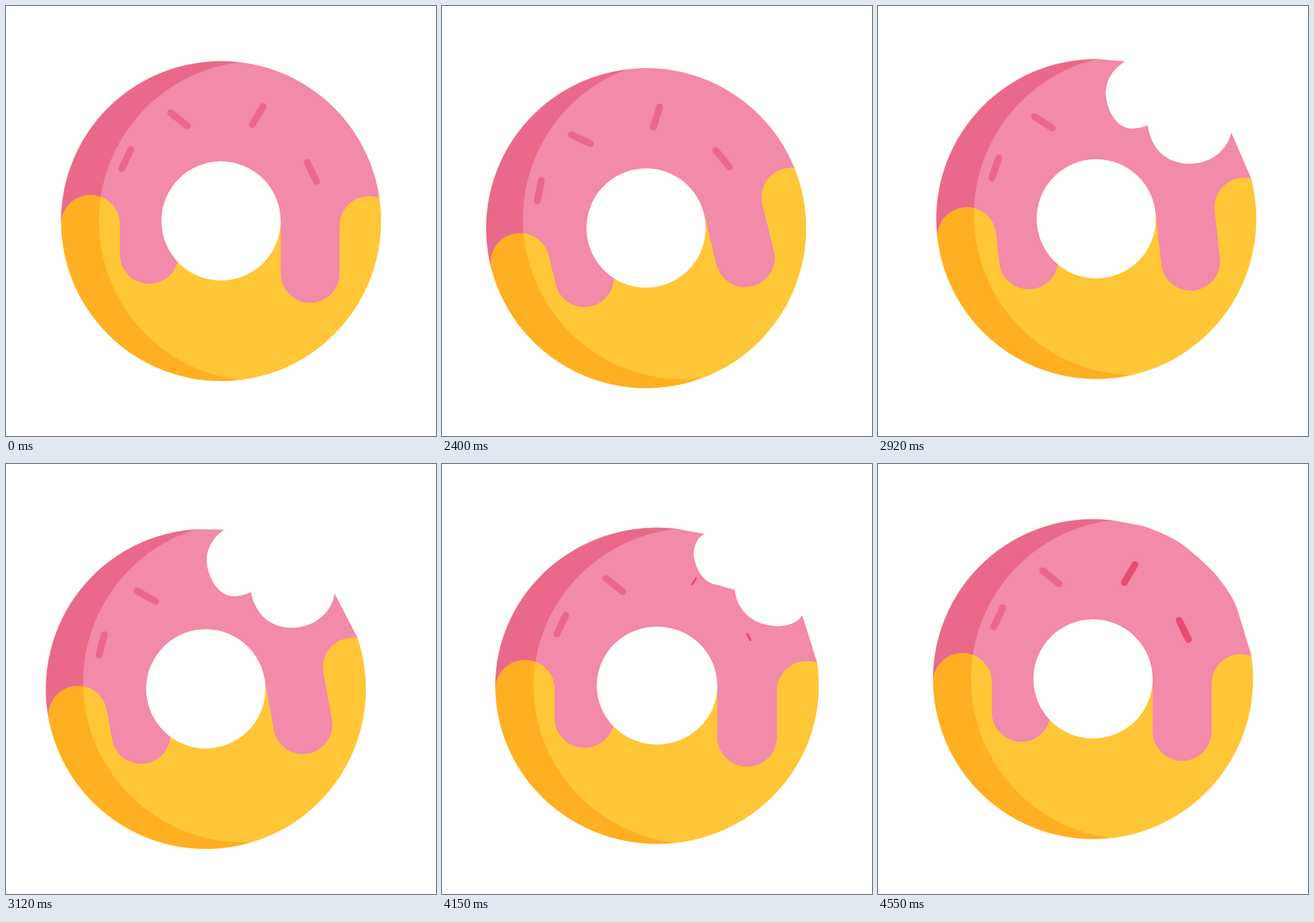
Animation of 748 by 748 pixels, one loop 4.57 s. Source, as an HTML page with a canvas:

```html
<!DOCTYPE html>
<html lang="en">
<head>
<meta charset="utf-8">
<title>Donut</title>
<style>
  html, body { margin: 0; width: 100%; height: 100%; overflow: hidden; background: #fff; }
  canvas { display: block; width: 748px; height: 748px; }
</style>
</head>
<body>
<canvas id="stage" width="748" height="748"></canvas>
<script>
const ctx = document.getElementById('stage').getContext('2d');
const LOOP = 4570, STEP = 25, TAU = Math.PI * 2;
const CX = 374, CY = 374.2, R = 278.4;
const YELLOW = '#ffc637', ORANGE = '#ffaf22', PINK = '#f28aaa', ROSE = '#ea698b', RED = '#e54c70';

// Each key: [time, value, warp of the progress towards this key]
const slide = [[2000, 0], [2350, -24.5, .8], [2705, 78.5], [2755, 78.5], [3045, -37.5], [3300, 10], [3500, 0]];
const turn = [[2000, 0], [2350, -15, .8], [2705, 7.6], [2755, 7.6], [3045, -14.5], [3300, 4], [3500, 0]];
const drop = [[4075, 0], [4365, 70], [4475, -9], [4550, 0]];
const squash = [[4075, 0], [4320, 1], [4365, 1], [4475, -.6], [4550, 0]];
const bite = [[2705, 0], [2780, 1], [4075, 1], [4275, 0]];

const smooth = u => u * u * (3 - 2 * u);

function valueAt(keys, t) {
  if (t <= keys[0][0]) return keys[0][1];
  for (let i = 1; i < keys.length; i++) {
    const [t0, a] = keys[i - 1], [t1, b, warp = 1] = keys[i];
    if (t < t1) return a + (b - a) * smooth(((t - t0) / (t1 - t0)) ** warp);
  }
  return keys[keys.length - 1][1];
}

// Rim points as [x, y]: the start, then three per cubic curve
const whole = [
  [457, 107], [468, 110], [479, 114], [490, 119], [502, 124], [514, 130], [525, 137],
  [539, 147], [553, 159], [565, 170], [577, 181], [589, 193], [598, 206],
  [608, 219], [618, 234], [624, 250]
];
const bitten = [
  [454, 107], [430, 118], [414, 139], [414, 165], [415, 198], [431, 225], [458, 225],
  [466, 225], [475, 224], [481, 222], [481, 267], [511, 297], [555, 297],
  [588, 297], [613, 279], [624, 251]
];

function outline(amount, lumpy) {
  const p = new Path2D();
  if (lumpy) {
    const pts = whole.map(([x, y], i) => [x + (bitten[i][0] - x) * amount, y + (bitten[i][1] - y) * amount]);
    p.arc(CX, CY, R, Math.atan2(333 - CY, 650 - CX), Math.atan2(98 - CY, 405 - CX));
    p.lineTo(...pts[0]);
    for (let i = 1; i < pts.length; i += 3) p.bezierCurveTo(...pts[i], ...pts[i + 1], ...pts[i + 2]);
    p.closePath();
  } else {
    p.arc(CX, CY, R, 0, TAU);
  }
  p.moveTo(CX + 103.8, 373.8);
  p.arc(CX, 373.8, 103.8, 0, TAU);
  return p;
}

const glaze = new Path2D();
glaze.moveTo(60, 60);
glaze.lineTo(60, 380);
glaze.lineTo(95.5, 380);
glaze.arc(146.8, 380, 51.3, Math.PI, 0);
glaze.lineTo(198, 432);
glaze.arc(249.2, 432, 51.2, Math.PI, 0, true);
glaze.lineTo(300.4, 374);
glaze.lineTo(477.8, 374);
glaze.lineTo(477.8, 465);
glaze.arc(529.1, 465, 51.3, Math.PI, 0, true);
glaze.lineTo(580.4, 382);
glaze.arc(631.7, 382, 51.3, Math.PI, TAU * .86);
glaze.lineTo(700, 334);
glaze.lineTo(700, 60);
glaze.closePath();

const rim = new Path2D();
rim.arc(CX, CY, R - .6, 0, TAU);
const shade = new Path2D();
shade.rect(0, 0, 748, 748);
shade.moveTo(440 + R, CY);
shade.arc(440, CY, R, 0, TAU);

function fillShade(color) {
  ctx.save();
  ctx.clip(rim);
  ctx.fillStyle = color;
  ctx.beginPath();
  ctx.rect(0, 0, 430, 748);
  ctx.clip();
  ctx.fill(shade, 'evenodd');
  ctx.restore();
}

function sprinkle(x0, y0, x1, y1, color, size = 1) {
  if (size <= .01) return;
  const mx = (x0 + x1) / 2, my = (y0 + y1) / 2;
  const dx = (x1 - x0) / 2 * size, dy = (y1 - y0) / 2 * size;
  ctx.strokeStyle = color;
  ctx.lineWidth = 12 * size;
  ctx.beginPath();
  ctx.moveTo(mx - dx, my - dy);
  ctx.lineTo(mx + dx, my + dy);
  ctx.stroke();
}

function draw(t) {
  const x = valueAt(slide, t), s = valueAt(squash, t), gone = valueAt(bite, t);
  ctx.setTransform(1, 0, 0, 1, 0, 0);
  ctx.fillStyle = '#fff';
  ctx.fillRect(0, 0, 748, 748);

  ctx.translate(CX + x, CY - .65 * x + valueAt(drop, t));
  ctx.rotate(valueAt(turn, t) * Math.PI / 180);
  ctx.scale(1 + .049 * s, 1 - .051 * s);
  ctx.translate(-CX, -CY);

  ctx.save();
  ctx.clip(outline(gone, t > 2705), 'evenodd');
  ctx.fillStyle = YELLOW;
  ctx.fillRect(0, 0, 748, 748);
  fillShade(ORANGE);
  ctx.fillStyle = PINK;
  ctx.fill(glaze);
  ctx.save();
  ctx.clip(glaze);
  fillShade(ROSE);
  ctx.restore();

  ctx.lineCap = 'round';
  const right = t >= 2550 ? RED : ROSE;
  sprinkle(286.5, 185.5, 315, 208.5, ROSE);
  sprinkle(217, 250, 201.5, 283, ROSE);
  sprinkle(447, 175, 428.5, 206, right, 1 - gone);
  sprinkle(524, 272, 540, 305, right, 1 - gone);
  ctx.restore();
}

const start = performance.now();
function tick() {
  const t = (performance.now() - start) % LOOP;
  draw(Math.floor((t + 5) / STEP) * STEP);
  requestAnimationFrame(tick);
}
tick();
</script>
</body>
</html>
```
